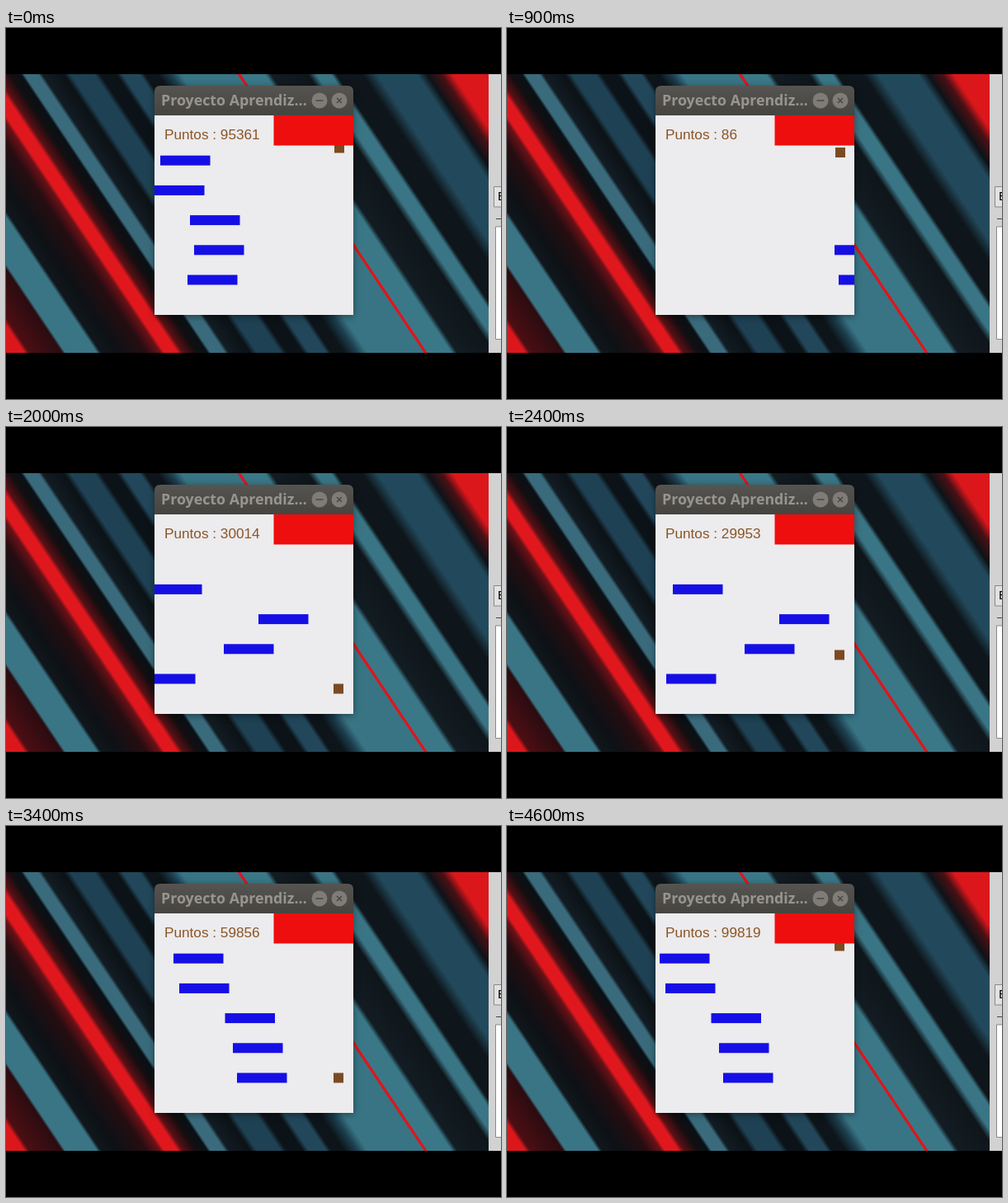
Recreate the animation shown at these times as an HTML page. Size 600 by 450 pixels, loop 4.7 s.

```html
<!DOCTYPE html>
<html lang="es">
<head>
<meta charset="utf-8">
<style>
  html, body { margin: 0; width: 100%; height: 100%; overflow: hidden; background: #000; }
  #stage { position: relative; width: 600px; height: 450px; overflow: hidden; background: #000; }
  #desk { position: absolute; top: 56px; width: 585px; height: 338px; overflow: hidden; }
  #stripes {
    position: absolute; left: -240px; width: 850px; height: 338px;
    transform-origin: 0 0; transform: skewX(33.8deg);
    background: linear-gradient(90deg,
      #dc171c 36px, #4c0e13 42px, #2a0c10 82px, #3a7585 86px 124px,
      #10171c 129px, #0d1115 150px, #260d11 184px, #6a1117 201px,
      #e0181d 206px 222px, #5c1015 228px, #160d10 244px, #0b1014 252px 258px,
      #3a6b7c 262px 279px, #121c23 284px, #0c1216 310px, #1e4153 318px 347px,
      #0c1318 354px 374px, #22475a 381px 402px, #0d151a 408px 424px,
      #1d4050 440px, #387484 452px 520px, #dc171c 521px 524px,
      #3a7888 525px 554px, #121c22 561px, #0f161b 606px, #3a7585 616px 634px,
      #0e161b 640px 672px, #22495b 690px 738px, #0d1318 750px,
      #4a1014 768px, #dc171c 781px);
  }
  svg { position: absolute; left: 0; top: 0; }
  #window { filter: drop-shadow(0 2px 4px #0006); }
</style>
</head>
<body>
<div id="stage">
  <div id="desk"><div id="stripes"></div></div>
  <svg width="600" height="450">
    <defs>
      <linearGradient id="bar" x2="0" y2="1">
        <stop stop-color="#565450"/><stop offset="1" stop-color="#464440"/>
      </linearGradient>
      <clipPath id="view"><path d="M180 106H421V348H180Z"/></clipPath>
    </defs>

    <path d="M585 56H600V394H585Z" fill="#d2d2d2"/>
    <path d="M601 192.5H591.5V217H601" fill="#e2e2e2" stroke="#888"/>
    <text x="596" y="209" font-family="Liberation Sans, sans-serif" font-size="15">E</text>
    <path d="M594 231.5H600" stroke="#444"/>
    <path d="M601 241H593.5V377.5H601" fill="#fff" stroke="#888"/>

    <g id="window">
      <path d="M180 106V77Q180 70 187 70H414Q421 70 421 77V106Z" fill="url(#bar)"/>
      <text x="188" y="94" fill="#989590" font-family="Noto Sans, sans-serif" font-weight="700" font-size="17.8">Proyecto Aprendiz…</text>
      <g fill="#7f7c77" stroke="#4a4844" stroke-width="1.6">
        <circle cx="380" cy="88" r="9.5" stroke="none"/>
        <circle cx="404" cy="88" r="9.5" stroke="none"/>
        <path d="M375.5 88H384.5M401 85L407 91M407 85L401 91"/>
      </g>

      <g clip-path="url(#view)">
        <path d="M180 106H421V348H180Z" fill="#ecebed"/>
        <g id="bars" fill="#150fe6"></g>
        <rect id="player" width="12" height="12" fill="#7a4b22"/>
        <path d="M324.5 106H421V142.5H324.5Z" fill="#ee0e0e"/>
        <text id="score" x="192" y="135" fill="#8a5526" font-family="Liberation Sans, Arial, sans-serif" font-size="17.2"></text>
      </g>
    </g>
  </svg>
</div>
<script>
const LOOP = 4700, STEP = 100, ROW = 36.2;

// bars: x per row, bottom row first; keys: time, score, player y, bar shift
const runs = [
  { bars: [220, 228, 223, 180, 187], keys: [[0, 95361, 139.5, 0]] },
  { bars: [402, 397], keys: [[200, 118, 332, -37], [900, 86, 145, 0]] },
  { bars: [257, 268, 240],
    keys: [[1000, 10085, 332, -30], [1500, 10060, 195.5, 0], [1700, 10051, 145, 12]] },
  { bars: [193, 288, 330, 201],
    keys: [[1800, 30045, 332, -36], [2400, 29953, 270.5, 0], [2700, 29932, 145, 18]] },
  { bars: [280, 275, 265.5, 210, 203],
    keys: [[2800, 59930, 332, -36], [3400, 59856, 299.5, 0], [4000, 59817, 176.5, 36],
           [4500, 59819, 145, -9.5], [4600, 99819, 139.5, -18]] }
];

const $ = id => document.getElementById(id);
const bars = Array.from({ length: 5 }, (_, row) => {
  const r = document.createElementNS("http://www.w3.org/2000/svg", "rect");
  r.setAttribute("width", 60.5);
  r.setAttribute("height", 12);
  r.setAttribute("y", 299.5 - row * ROW);
  $("bars").append(r);
  return r;
});

function sample(keys, t) {
  const i = keys.findLastIndex(k => k[0] <= t);
  const a = keys[i], b = keys[i + 1] || a;
  const f = b === a ? 0 : (t - a[0]) / (b[0] - a[0]);
  const mix = a.map((v, n) => v + (b[n] - v) * f);
  // the level bonus arrives all at once
  if (Math.abs(b[1] - a[1]) > 1000) mix[1] = a[1];
  return mix;
}

function draw(now) {
  const t = Math.floor(now % LOOP / STEP) * STEP;
  const run = runs.findLast(r => r.keys[0][0] <= t);
  const [, score, y, shift] = sample(run.keys, t);
  bars.forEach((bar, row) => bar.setAttribute("x", row in run.bars ? run.bars[row] + shift : -100));
  $("player").setAttribute("x", t < 1000 ? 398 : 397);
  $("player").setAttribute("y", y);
  $("score").textContent = "Puntos : " + Math.round(score);
}

const start = performance.now();
function tick() {
  draw(performance.now() - start);
  requestAnimationFrame(tick);
}
tick();
</script>
</body>
</html>
```
